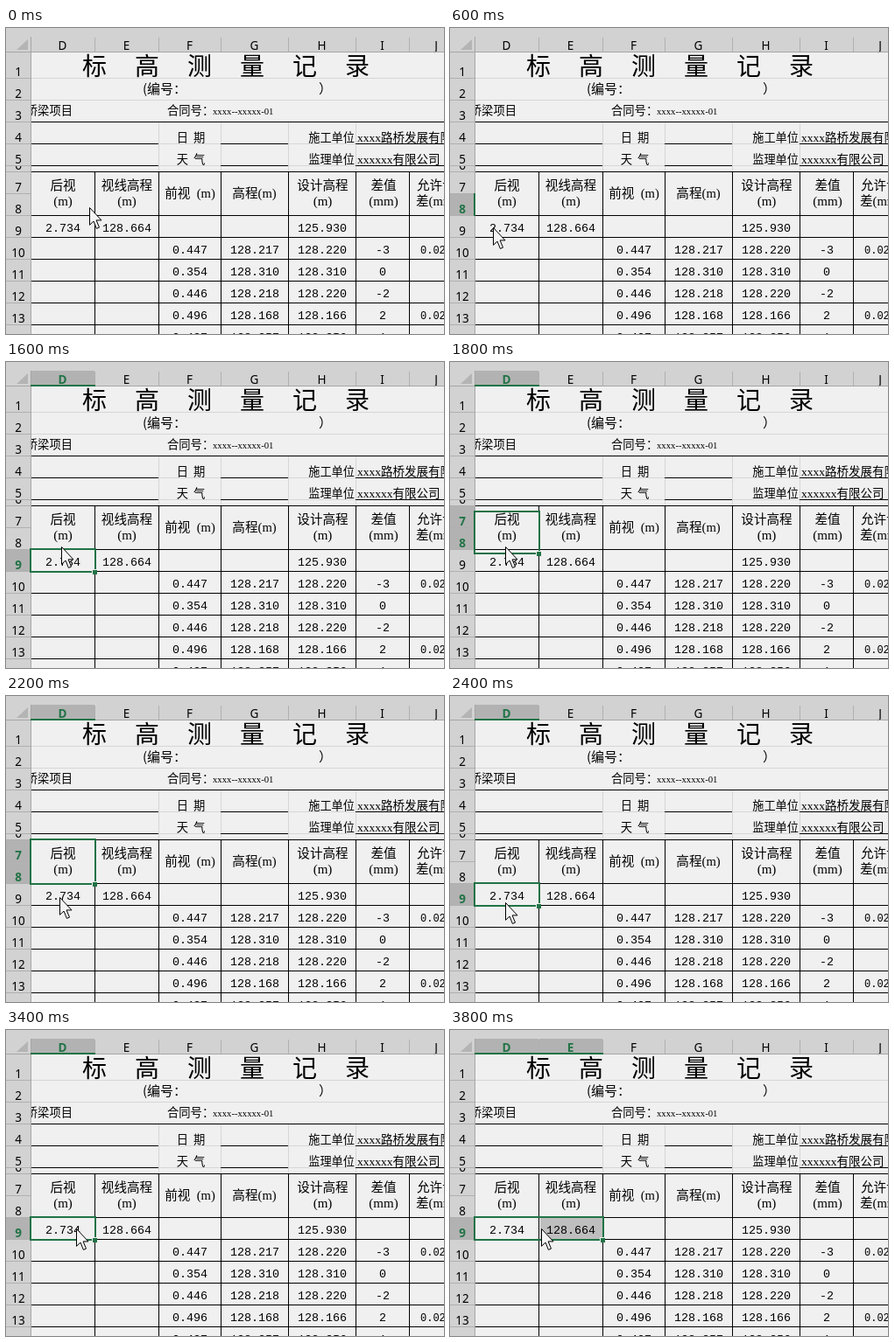
These frames come from a looping animation (500x350 px, 4000 ms). An HTML page:

```html
<!DOCTYPE html>
<html lang="zh-CN">
<head>
<meta charset="utf-8">
<title>标高测量记录</title>
<style>
  html, body { margin: 0; width: 100%; height: 100%; overflow: hidden; background: #f0f0f0; }
  svg { display: block; }
  text { white-space: pre; font-family: "SimSun", "Noto Sans CJK SC", "Noto Sans CJK", sans-serif; fill: #000; }
  .latin { font-family: "Liberation Serif", "Noto Sans CJK SC", serif; }
  .mono { font-family: "Liberation Mono", monospace; }
  .head { font-family: "Noto Sans", "Open Sans", sans-serif; }
  .title { font-weight: 500; letter-spacing: 32px; }
</style>
</head>
<body>
<svg id="stage" width="500" height="350" viewBox="0 0 500 350" shape-rendering="crispEdges"></svg>
<script>
const NS = "http://www.w3.org/2000/svg";
const stage = document.getElementById("stage");
const GREEN = "#217346", HEADER = "#d2d2d2", ACTIVE = "#b2b2b2", PAPER = "#f0f0f0";
const colX = [29, 102, 175, 246, 323, 400, 461, 523];
const rowY = [28, 58, 83, 108, 133, 158, 165, 190, 215, 240, 265, 290, 315, 340, 365];

function add(tag, attrs, parent = stage) {
  const node = document.createElementNS(NS, tag);
  set(node, attrs);
  return parent.appendChild(node);
}
function set(node, attrs) {
  for (const key in attrs) node.setAttribute(key, attrs[key]);
}
const rect = (x, y, width, height, fill, parent) => add("rect", { x, y, width, height, fill }, parent);
const hline = (x1, x2, y, color = "#000") => rect(x1, y, x2 - x1, 1, color);
const vline = (x, y1, y2, color = "#000") => rect(x, y1, 1, y2 - y1, color);
function label(str, x, y, size, cls = "cjk", anchor = "start", parent = stage) {
  const node = add("text", { x, y, "font-size": size, class: cls, "text-anchor": anchor }, parent);
  node.textContent = str;
  return node;
}

// Sheet
rect(0, 0, 500, 350, PAPER);
const rangeFill = rect(103, 215, 72, 24, "#bebebe");
const soft = "#d6d6d6";
[57, 82].forEach(y => hline(29, 500, y, soft));
[[174, 245], [322, 399]].forEach(([a, b]) => [132, 157].forEach(y => hline(a, b, y, soft)));
[174, 245, 322, 399].forEach(x => vline(x, 108, 164, soft));
hline(29, 500, 107);
[[29, 174], [245, 322], [399, 500]].forEach(([a, b]) => [132, 157].forEach(y => hline(a, b, y)));
[164, 214, 239, 264, 289, 314, 339].forEach(y => hline(29, 500, y));
[101, 174, 245, 322, 399, 460].forEach(x => vline(x, 164, 350));

// Heading block
label("标高测量记录", 87, 54, 28, "title");
label("(编号：", 156, 74.5, 15);
label("）", 357, 74.5, 15);
label("桥梁项目", 76, 99, 13.3, "cjk", "end");
label("合同号：", 184, 99, 13.3);
label("xxxx--xxxxx-01", 236, 99, 10.7, "latin");
label("日  期", 211, 130, 13.3, "cjk", "middle");
label("天  气", 211, 154.5, 13.3, "cjk", "middle");
label("施工单位", 398, 130, 13.2, "cjk", "end");
label("监理单位", 398, 154.5, 13.2, "cjk", "end");
label("xxxx路桥发展有限公司", 401, 130, 13.5, "latin");
label("xxxxxx有限公司", 401, 154.5, 13.5, "latin");

// Table headings
const heading = (x, first, second) => {
  label(first, x, second ? 184.5 : 193.5, 14.6, "latin", "middle");
  if (second) label(second, x, 203, 15, "latin", "middle");
};
heading(65, "后视", "(m)");
heading(138, "视线高程", "(m)");
heading(210, "前视  (m)");
heading(283.5, "高程(m)");
heading(361.5, "设计高程", "(m)");
heading(431, "差值", "(mm)");
label("允许误", 469, 184.5, 14.6);
label("差(mm)", 468, 203, 14.6, "latin");

// Measured values: level = sight line - foresight, difference in mm
const baseline = row => (rowY[row] + rowY[row + 1]) / 2 + 5;
const value = (str, x, row) => label(str, x, baseline(row), 13.35, "mono", "middle");
const sightLine = 128.664;
value("2.734", 65, 8);
value(sightLine.toFixed(3), 138, 8);
value("125.930", 361, 8);
[[0.447, 128.220], [0.354, 128.310], [0.446, 128.220], [0.496, 128.166], [0.407, 128.256]]
  .forEach(([foresight, design], i) => {
    const level = sightLine - foresight;
    value(foresight.toFixed(3), 210, 9 + i);
    value(level.toFixed(3), 284, 9 + i);
    value(design.toFixed(3), 361, 9 + i);
    value(String(Math.round((level - design) * 1000)), 430, 9 + i);
  });
[9, 12].forEach(row => label("0.02", 473, baseline(row), 12, "mono"));

// Row and column headers
rect(0, 0, 500, 27, HEADER);
rect(0, 0, 28, 350, HEADER);
const colHeads = [..."DEFGHIJ"].map((name, i) => {
  const x = colX[i], w = colX[i + 1] - x;
  const back = rect(x, 10, w - 1, 17, HEADER);
  vline(x + w - 1, 11, 27, "#b0b0b0");
  return { back, text: label(name, x + w / 2 - 1, 24.5, 13.5, "head", "middle") };
});
const rowHeads = rowY.slice(0, -1).map((y, i) => {
  const h = rowY[i + 1] - y;
  const box = add("svg", { x: 0, y, width: 28, height: h });
  const back = rect(0, 0, 28, h, HEADER, box);
  rect(0, h - 1, 28, 1, "#b0b0b0", box);
  return { back, text: label(String(i + 1), 14, h - 3, 13.5, "head", "middle", box) };
});
hline(0, 500, 27, "#a6a6a6");
vline(28, 10, 350, "#a6a6a6");
add("path", { d: "M25 13V25H12Z", fill: "#b4b4b4", "shape-rendering": "auto" });

// Selection and pointer
const selection = add("g", {});
const colMark = rect(0, 26, 0, 2, GREEN, selection);
const rowMark = rect(27, 0, 2, 0, GREEN, selection);
const frame = add("rect", { fill: "none", stroke: GREEN, "stroke-width": 2 }, selection);
const handleEdge = rect(0, 0, 6, 6, PAPER, selection);
const handle = rect(0, 0, 5, 5, GREEN, selection);
const pointer = add("path", {
  d: "M.5 .5V20.3L5 16L8.4 24.4L11.5 23.1L8.1 14.9H14Z",
  fill: "#f4f4f4", stroke: "#000", "stroke-width": 1, "shape-rendering": "auto"
});

// One pointer position per 200 ms step
const STEP = 200, LOOP = 4000;
const path = [
  [95, 205], [107, 207], [73, 217], [49, 228], [49, 228],
  [60, 228], [61, 231], [62, 229], [63, 211], [63, 211],
  [62, 226], [61, 230], [63, 236], [59, 229], [60, 229],
  [65, 229], [62, 227], [80, 227], [104, 227], [104, 227]
];
// Selection states: start time, box [left, top, right, bottom], lit columns and rows
const states = [
  { at: 0, box: null, cols: [], rows: [] },
  { at: 200, box: [540, 189, 612, 215], cols: [], rows: [8] },
  { at: 800, box: [48, 213, 122, 239], cols: [0], rows: [9] },
  { at: 1000, box: [28, 214, 102, 240], cols: [0], rows: [9] },
  { at: 1800, box: [28, 171, 102, 219], cols: [0], rows: [7, 8] },
  { at: 2000, box: [28, 164, 102, 215], cols: [0], rows: [7, 8] },
  { at: 2400, box: [28, 214, 102, 240], cols: [0], rows: [9] },
  { at: 3600, box: [28, 214, 166, 240], cols: [0, 1], rows: [9] },
  { at: 3800, box: [28, 214, 175, 240], cols: [0, 1], rows: [9] }
];

function light(head, on) {
  head.back.setAttribute("fill", on ? ACTIVE : HEADER);
  head.text.style.fill = on ? GREEN : "";
  head.text.style.fontWeight = on ? 700 : "";
}

function draw(time) {
  const t = time % LOOP;
  const [px, py] = path[Math.floor(t / STEP)];
  pointer.setAttribute("transform", `translate(${px} ${py})`);

  const { box, cols, rows } = states.filter(s => s.at <= t).pop();
  colHeads.forEach((head, i) => light(head, cols.includes(i)));
  rowHeads.forEach((head, i) => light(head, rows.includes(i + 1)));
  rangeFill.style.display = cols.length > 1 ? "" : "none";
  selection.style.display = box ? "" : "none";
  if (!box) return;
  const [x, y, right, bottom] = box;
  const width = right - x, height = bottom - y;
  set(frame, { x, y, width, height });
  set(colMark, { x, width });
  set(rowMark, { y, height });
  set(handleEdge, { x: right - 4, y: bottom - 3 });
  set(handle, { x: right - 3, y: bottom - 2 });
}

const start = performance.now();
function tick() {
  draw(performance.now() - start);
  requestAnimationFrame(tick);
}
tick();
</script>
</body>
</html>
```
